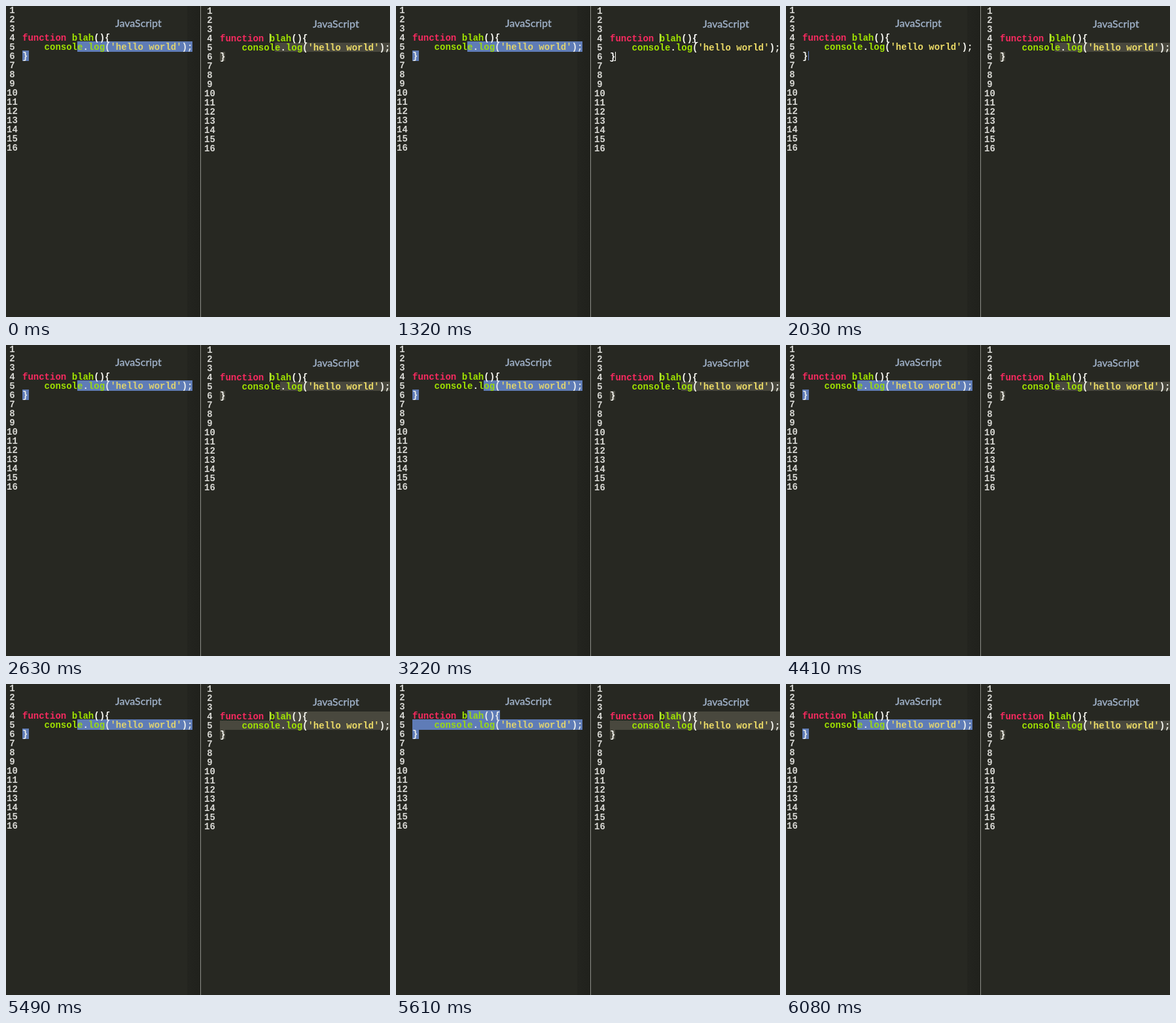
An HTML page for the animation above (7340 ms loop, 587 px wide and 475 px high).

```html
<!DOCTYPE html>
<html lang="en">
<head>
<meta charset="utf-8">
<title>Mirrored selection</title>
<style>
  html, body { margin: 0; width: 100%; height: 100%; overflow: hidden; background: #272822; }
  #stage { position: relative; width: 587px; height: 475px; overflow: hidden; background: #272822; }
  #shade { position: absolute; left: 277px; top: 0; width: 20px; height: 475px;
    background: linear-gradient(90deg, #23241f, #20211c); }
  #divider { position: absolute; left: 297px; top: 0; width: 1px; height: 475px; background: #8f908a; }
  .pane { position: absolute; width: 290px; height: 475px; isolation: isolate; }
  .pane div { position: absolute; white-space: pre; }
  .num, .code { font: bold 14px/14px "Liberation Mono", "Courier New", monospace; }
  .num { left: 0; width: 19px; text-align: center; color: #d8d8d4; }
  .code { left: 25px; color: #f8f8f2; }
  .label { left: 167px; top: 16px; font: 16px/20px Lato, sans-serif; color: #a3b5cd;
    -webkit-text-stroke: 0.3px; }
  .k { color: #f92a60; }
  .f { color: #a0e300; }
  .s { color: #eddc67; }
  .match .b { color: #fff; text-decoration: underline 1px; }
  .sel::before, .sel::after { content: ""; position: absolute; inset: 0; background: var(--sel); }
  .sel::before { z-index: -1; }
  .sel::after { z-index: 1; opacity: var(--tint); }
  .caret { width: 1px; height: 14px; background: var(--caret); }
</style>
</head>
<body>
<div id="stage">
  <div id="shade"></div>
  <div id="divider"></div>
</div>
<script>
const LOOP = 7340, CHAR = 8.4, ROW = 14, INDENT = 25;
const UP = "up", CARET = "caret";
const stage = document.getElementById("stage");

const code = {
  4: '<span class="k">function</span> <span class="f">blah</span>()<span class="b">{</span>',
  5: '    <span class="f">console</span>.<span class="f">log</span>(' +
     '<span class="s">\'hello world\'</span>);',
  6: '<span class="b">}</span>'
};

// Each step: start time and first selected column on row 5, UP (from row 4) or CARET.
const left = {
  x: 0, y: 0, sel: "#5f7cb6", tint: 0.1, caret: "#6585c8", caretX: 34,
  rowTop: -2, rowHeight: 16, ends: { 4: 16, 5: 31, 6: 1.15 },
  steps: [[0, 10], [1440, CARET], [2150, 10], [2750, 11], [2990, 12], [3220, 13],
          [3690, 12], [4170, 11], [4410, 10], [5610, UP], [6080, 10]]
};
const right = {
  x: 302, y: 1, sel: "#49483e", tint: 0, caret: "#f8f8f0", caretX: 33,
  rowTop: -1, rowHeight: 14, ends: { 4: 31, 5: 31, 6: 1 }, match: true,
  steps: [[0, 10], [1320, CARET], [2030, 10], [2630, 11], [2870, 12], [3220, 13],
          [3580, 12], [4050, 11], [4290, 10], [5490, UP], [5960, 10]]
};

function add(parent, cls, html = "") {
  const el = document.createElement("div");
  el.className = cls;
  el.innerHTML = html;
  parent.appendChild(el);
  return el;
}

function place(el, x, y, w, h) {
  Object.assign(el.style, { left: x + "px", top: y + "px", width: w + "px", height: h + "px" });
}

function build(p) {
  p.el = add(stage, "pane");
  place(p.el, p.x, p.y, 290, 475);
  p.el.style.setProperty("--sel", p.sel);
  p.el.style.setProperty("--tint", p.tint);
  p.el.style.setProperty("--caret", p.caret);
  add(p.el, "label", "JavaScript");
  for (let n = 1; n <= 16; n++) {
    const top = (n - 1) * ROW + "px";
    add(p.el, "num", n).style.top = top;
    if (code[n]) add(p.el, "code", code[n]).style.top = top;
  }
  p.rows = { 4: add(p.el, "sel"), 5: add(p.el, "sel"), 6: add(p.el, "sel") };
  p.cursor = add(p.el, "caret");
  place(p.cursor, p.caretX, 5 * ROW - 1, 1, ROW);
}

function mark(p, row, from) {
  const el = p.rows[row];
  el.hidden = from === null;
  if (el.hidden) return;
  const x = Math.round(INDENT + from * CHAR);
  const end = Math.round(INDENT + p.ends[row] * CHAR);
  place(el, x, (row - 1) * ROW + p.rowTop, end - x, p.rowHeight);
}

function show(p, t) {
  const state = p.steps.findLast(s => s[0] <= t)[1];
  if (state === p.state) return;
  p.state = state;
  const idle = state === CARET, up = state === UP;
  mark(p, 4, up ? 10 : null);
  mark(p, 5, idle ? null : up ? 0 : state);
  mark(p, 6, idle ? null : 0);
  p.cursor.hidden = !idle;
  p.el.classList.toggle("match", idle && !!p.match);
}

const panes = [left, right];
panes.forEach(build);

// Resting text pointer beside the function name
const pointer = add(right.el, "caret");
place(pointer, 101, 41, 1, 14);
pointer.style.background = "#dfe3a0";

const start = performance.now();
function frame() {
  const t = (performance.now() - start) % LOOP;
  panes.forEach(p => show(p, t));
  requestAnimationFrame(frame);
}
frame();
</script>
</body>
</html>
```
